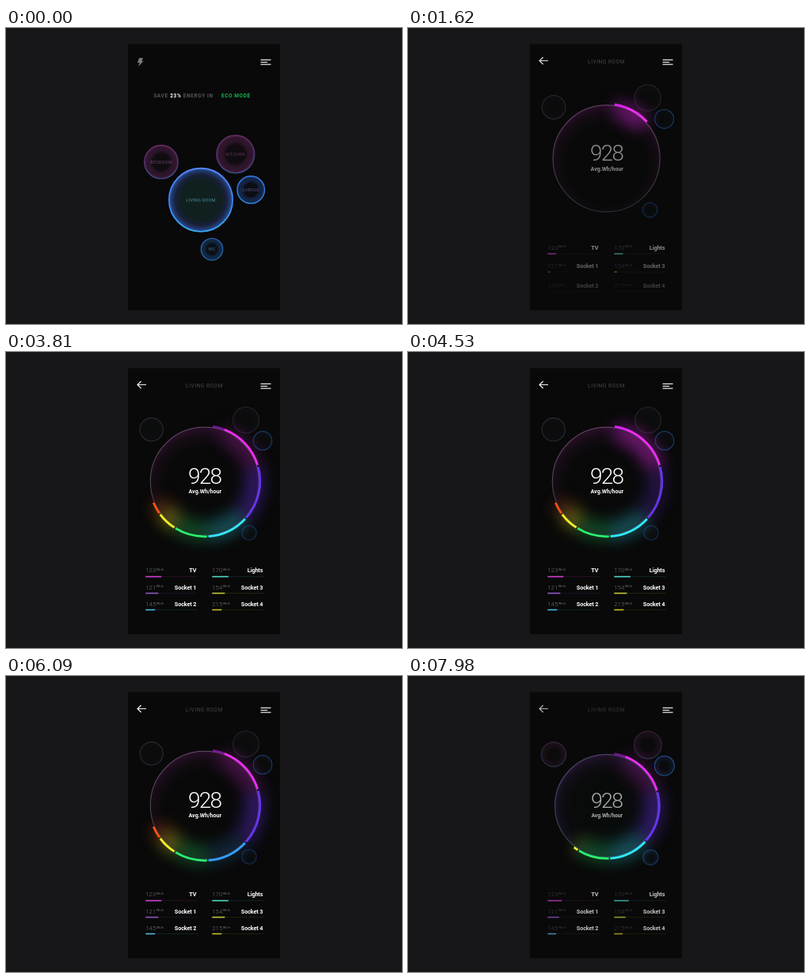
Animation, 500 px wide and 375 px high, one loop 8000 ms. Source, as an HTML page:

```html
<!DOCTYPE html>
<html lang="en">
<head>
<meta charset="utf-8">
<title>Home energy</title>
<style>
  html, body { margin: 0; width: 100%; height: 100%; overflow: hidden; background: #171719; }
  svg { display: block; width: 100vw; height: 100vh; }
  text { font-family: Roboto, "Open Sans", sans-serif; }
  .caps { font-size: 6.5px; letter-spacing: .58px; }
  .label { font-size: 5.4px; letter-spacing: .3px; text-anchor: middle; }
  .bold { font-weight: 700; }
  .device { font-size: 7.3px; letter-spacing: -.15px; text-anchor: end; }
</style>
</head>
<body>
<svg id="stage" viewBox="0 0 500 375">
  <defs>
    <clipPath id="panel"><rect x="154" y="20.5" width="192" height="337"/></clipPath>
    <filter id="blur" filterUnits="userSpaceOnUse" x="130" y="20" width="240" height="300" color-interpolation-filters="sRGB">
      <feGaussianBlur stdDeviation="9"/>
    </filter>
  </defs>
  <rect width="500" height="375" fill="#171719"/>
  <rect x="154" y="20.5" width="192" height="337" fill="#090909"/>
  <g id="scene" clip-path="url(#panel)"></g>
</svg>
<script>
const LOOP = 8000;
const NS = 'http://www.w3.org/2000/svg';
const scene = document.getElementById('scene');
const defs = document.querySelector('defs');

function add(parent, tag, attrs = {}, text) {
  const el = document.createElementNS(NS, tag);
  set(el, attrs);
  if (text !== undefined) el.textContent = text;
  parent.appendChild(el);
  return el;
}
function set(el, attrs) {
  for (const k in attrs) el.setAttribute(k, attrs[k]);
}
function gradient(type, id, stops, attrs = {}) {
  const g = add(defs, type, { id, ...attrs });
  for (const [offset, color, alpha = 1] of stops)
    add(g, 'stop', { offset, 'stop-color': color, 'stop-opacity': alpha });
  return `url(#${id})`;
}

const clamp = x => Math.max(0, Math.min(1, x));
const lerp = (a, b, p) => a + (b - a) * p;
const ramp = (t, start, length) => clamp((t - start) / length);
const inOut = x => x < .5 ? 4 * x ** 3 : 1 - (2 - 2 * x) ** 3 / 2;
const out = x => 1 - (1 - x) ** 3;
const mix = (a, b, p) => `rgb(${a.map((v, i) => Math.round(lerp(v, b[i], p)))})`;

// Smooth value through [time, value] points
function track(points, t) {
  if (t <= points[0][0]) return points[0][1];
  for (let i = 1; i < points.length; i++) {
    const [t0, v0] = points[i - 1], [t1, v1] = points[i];
    if (t <= t1) {
      const x = (t - t0) / (t1 - t0);
      return lerp(v0, v1, x * x * (3 - 2 * x));
    }
  }
  return points[points.length - 1][1];
}

// Ring: start angle, end angle, colour, glow strength (degrees clockwise from top)
const MAGENTA = [222, 32, 244], DIM_PURPLE = [92, 20, 128];
const AZURE = [48, 160, 255], CYAN = [48, 232, 250];
const ORANGE = [250, 84, 20], RUST = [150, 44, 14];
const RING_START = 8.5, RING_END = 247;
const segments = [
  [8.5, 21, MAGENTA, .3], [21, 73, [242, 44, 246], .36], [75, 131.5, [104, 52, 250], .36],
  [133, 176, AZURE, .3], [177.5, 211.5, [40, 244, 110], .26],
  [213, 233, [246, 240, 40], .34], [234.5, 247, ORANGE, .26]
];

function arc(cx, cy, r, from, to) {
  const point = a => {
    const k = a * Math.PI / 180;
    return `${(cx + r * Math.sin(k)).toFixed(2)} ${(cy - r * Math.cos(k)).toFixed(2)}`;
  };
  return to <= from ? '' : `M${point(from)}A${r} ${r} 0 0 1 ${point(to)}`;
}

// Bubbles
const purpleRim = [[0, '#6c2e66'], [.5, '#54387c'], [1, '#38588e']];
const blueRim = [[0, '#3f84f4'], [1, '#2a8ce0']];
const dimBlueRim = [[0, '#2a5cae'], [1, '#2468a4']];
const bubbles = [
  { name: 'BEDROOM', from: [196, 169.7, 21.3], to: [183.7, 98.3, 14.7], rim: purpleRim, shade: '#5e2558', core: '#100c10', ink: '#6b4468', ghost: '#222a2a' },
  { name: 'KITCHEN', from: [289.8, 159.8, 24], to: [303, 86.3, 16.5], rim: purpleRim, shade: '#5e2558', core: '#100c10', ink: '#5d3a5a', ghost: '#1e2022' },
  { name: 'GARAGE', from: [309.2, 205, 17.3], to: [324, 112.4, 11.8], rim: blueRim, shade: '#1f4a98', core: '#0c0e16', ink: '#52507c', ghost: '#16345c' },
  { name: 'WC', from: [260, 280.3, 13.8], to: [307, 229, 9.2], rim: dimBlueRim, shade: '#1c4c88', core: '#0b1018', ink: '#3f6ea0', ghost: '#14264a' },
  { name: 'LIVING ROOM', from: [246, 217.8, 40.2], to: [250.7, 163.7, 68.4], rim: [[0, '#5a8cff'], [.5, '#3c84f4'], [1, '#36b0f4']], shade: '#2c5cb4', core: '#102221', ink: '#4c8fa0', ghost: 'none', big: true }
];
bubbles.forEach((b, i) => {
  const fill = gradient('radialGradient', 'fill' + i, b.big
    ? [[0, '#10211f'], [.62, '#10201f'], [.8, '#182038'], [.92, '#22386c'], [1, b.shade]]
    : [[0, b.core], [.5, b.core], [.85, b.shade, .42], [1, b.shade, .8]]);
  const rim = gradient('linearGradient', 'rim' + i, b.rim, { x2: 0, y2: 1 });
  b.ghost = add(scene, 'circle', { fill: '#0b0c0c', stroke: b.ghost, 'stroke-width': 1.1 });
  b.ball = add(scene, 'circle', { fill, stroke: rim, 'stroke-width': b.big ? 1.7 : 1.2 });
  b.label = add(scene, 'text', { class: 'label', fill: b.ink }, b.name);
});
const living = bubbles[4];

const lens = add(scene, 'circle', {
  fill: gradient('radialGradient', 'lensFill',
    [[0, '#090909'], [.66, '#090909'], [.86, '#140c14'], [1, '#2a0f28']], { cy: .56, r: .56 }),
  stroke: gradient('linearGradient', 'lensRim',
    [[0, '#6a4a6c'], [.5, '#4c444e'], [1, '#2c2c34']], { x2: 0, y2: 1 }),
  'stroke-width': 1.1
});
const glow = add(scene, 'g', { filter: 'url(#blur)', fill: 'none', 'stroke-width': 25 });
const ring = add(scene, 'g', { fill: 'none', 'stroke-width': 2.7 });
const parts = segments.map(([from, to, color, strength]) => {
  const stroke = `rgb(${color})`;
  return { from, to, strength, line: add(ring, 'path', { stroke }), halo: add(glow, 'path', { stroke }) };
});

const reading = add(scene, 'g');
add(reading, 'text', { y: 3.1, fill: '#fff', 'text-anchor': 'middle', style: 'font-size:28px;font-weight:300;letter-spacing:-1.7px' }, '928');
add(reading, 'text', { x: .6, y: 15.5, class: 'bold', fill: '#fff', 'text-anchor': 'middle', style: 'font-size:7.1px' }, 'Avg.Wh/hour');

// Header
const bolt = add(scene, 'path', { d: 'M168.2 38H173L171.2 41.8H173.6L167 49L168.8 44H166Z', fill: '#7c7c7c' });
const back = add(scene, 'path', { d: 'M177 41.5H166M170.6 37L166 41.5L170.6 46', fill: 'none', stroke: '#eee', 'stroke-width': 1.2 });
add(scene, 'path', { d: 'M321.5 40.4H334.5M321.5 43.3H330M321.5 46.2H334.5', stroke: '#e4e4e4', 'stroke-width': 1.2 });
const title = add(scene, 'text', { class: 'caps', x: 250.5, 'text-anchor': 'middle', fill: '#484848' }, 'LIVING ROOM');

const promo = add(scene, 'g', { class: 'caps bold' });
const promoParts = [[186.3, 'SAVE', '#555'], [207.3, '23%', '#fff'], [223.8, 'ENERGY IN', '#555'], [272, 'ECO MODE', '#14b450']]
  .map(([x, text, fill]) => add(promo, 'text', { x, y: 88, fill }, text));

// Device list
const devices = [
  ['123', 'TV', 20, '#d43cd0'], ['170', 'Lights', 20.5, '#50d8c8'],
  ['121', 'Socket 1', 16, '#8c58c4'], ['154', 'Socket 3', 16, '#c4c83c'],
  ['145', 'Socket 2', 12, '#50b4dc'], ['215', 'Socket 4', 12, '#c8bc28']
];
const rows = devices.map(([value, name, length, color], i) => {
  const x = i % 2 ? 260.3 : 176.3, row = i >> 1;
  const y = 279.2 + 21.6 * row;
  const lineY = 284.6 + 21 * row;
  const g = add(scene, 'g');
  const amount = add(g, 'g', { fill: '#707070' });
  add(amount, 'text', { x, y, style: 'font-size:7.8px;font-weight:300' }, value);
  add(amount, 'text', { x: x + 13.4, y: y - 2.6, style: 'font-size:4px' }, 'Wh/h');
  add(g, 'text', { x: x + 64, y, class: 'bold device', fill: '#fff' }, name);
  add(g, 'rect', { x, y: lineY - .4, width: 65.5, height: .9, fill: color, opacity: .15 });
  const bar = add(g, 'rect', { x, y: lineY - .8, height: 1.6, fill: color });
  return { g, amount, bar, length, row };
});

function draw(t) {
  const move = inOut(ramp(t, 640, 1220)) - inOut(ramp(t, 7790, 1220));
  const grow = inOut(ramp(t, 640, 1220)) - inOut(ramp(t, 7600, 1220));
  const trim = inOut(ramp(t, 1200, 1220)) - inOut(ramp(t, 7600, 1220));
  const leave = ramp(t, 7480, 1500);

  // Home screen
  const home = 1 - ramp(t, 700, 460);
  set(promo, { transform: `translate(0 ${-4 * ramp(t, 640, 290) ** 2 - 6 * ramp(t, 930, 230)})` });
  promoParts.forEach((el, i) => set(el, { opacity: i === 1 ? Math.sqrt(home) : home }));
  set(bolt, { opacity: home });

  const detail = inOut(ramp(t, 850, 900)) * (1 - .9 * leave);
  const label = 1 - ramp(t, 750, 560);
  for (const b of bubbles) {
    const x = lerp(b.from[0], b.to[0], move);
    const y = lerp(b.from[1], b.to[1], move);
    const r = lerp(b.from[2], b.to[2], grow);
    set(b.ghost, { cx: x, cy: y, r, opacity: detail });
    set(b.ball, { cx: x, cy: y, r, opacity: lerp(1, b.big ? 0 : .08, detail) });
    set(b.label, { x, y: y + 1.9, opacity: label });
    Object.assign(b, { x, y, r });
  }

  // Ring with shifting light
  const { x, y, r } = living;
  set(lens, { cx: x, cy: y, r, opacity: detail });
  const end = lerp(RING_START, RING_END, trim);
  const dim = track([[1900, 0], [2460, .35], [3810, .85], [4300, 0], [5200, 0], [6090, .8], [6900, 0], [7980, .85]], t);
  const cyan = track([[2460, 0], [3810, 1], [5310, 1], [6090, 0], [6900, .3], [7980, 1]], t);
  const rust = track([[4300, 0], [5310, 1], [6090, 0]], t);
  const tint = { 0: mix(MAGENTA, DIM_PURPLE, dim), 3: mix(AZURE, CYAN, cyan), 6: mix(ORANGE, RUST, rust) };
  const pulse = { 0: 1 - dim, 1: 1 - .6 * dim, 2: .6 + .4 * dim, 3: .6 + .4 * cyan, 6: 1 - .5 * rust };
  parts.forEach((p, i) => {
    const to = Math.min(p.to, end);
    set(p.line, { d: arc(x, y, r + 1.7, p.from, to) });
    set(p.halo, { d: arc(x, y, r - 5, p.from, to), opacity: p.strength * (pulse[i] ?? 1) });
    if (tint[i]) {
      set(p.line, { stroke: tint[i] });
      set(p.halo, { stroke: tint[i] });
    }
  });

  // Detail screen
  set(reading, {
    transform: `translate(${x} ${y}) scale(${lerp(.6, 1, grow)})`,
    opacity: ramp(t, 1350, 500) * (1 - leave)
  });
  set(back, { opacity: ramp(t, 1160, 500) * (1 - .8 * leave) });
  set(title, {
    y: 45.3 + 7.2 * (1 - inOut(ramp(t, 800, 700))) - leave,
    opacity: ramp(t, 830, 300) * (1 - .8 * leave)
  });
  for (const { g, amount, bar, length, row } of rows) {
    const enter = ramp(t, 1250 + row * 110, 700);
    set(g, { transform: `translate(0 ${14 * (1 - out(enter))})`, opacity: enter * (1 - .75 * leave) });
    set(amount, { opacity: 1 - leave });
    set(bar, { width: length * out(ramp(t, 1450 + row * 110, 750)) * (1 - .3 * leave) });
  }
}

const began = performance.now();
function frame() {
  draw((performance.now() - began) % LOOP);
  requestAnimationFrame(frame);
}
frame();
</script>
</body>
</html>
```
